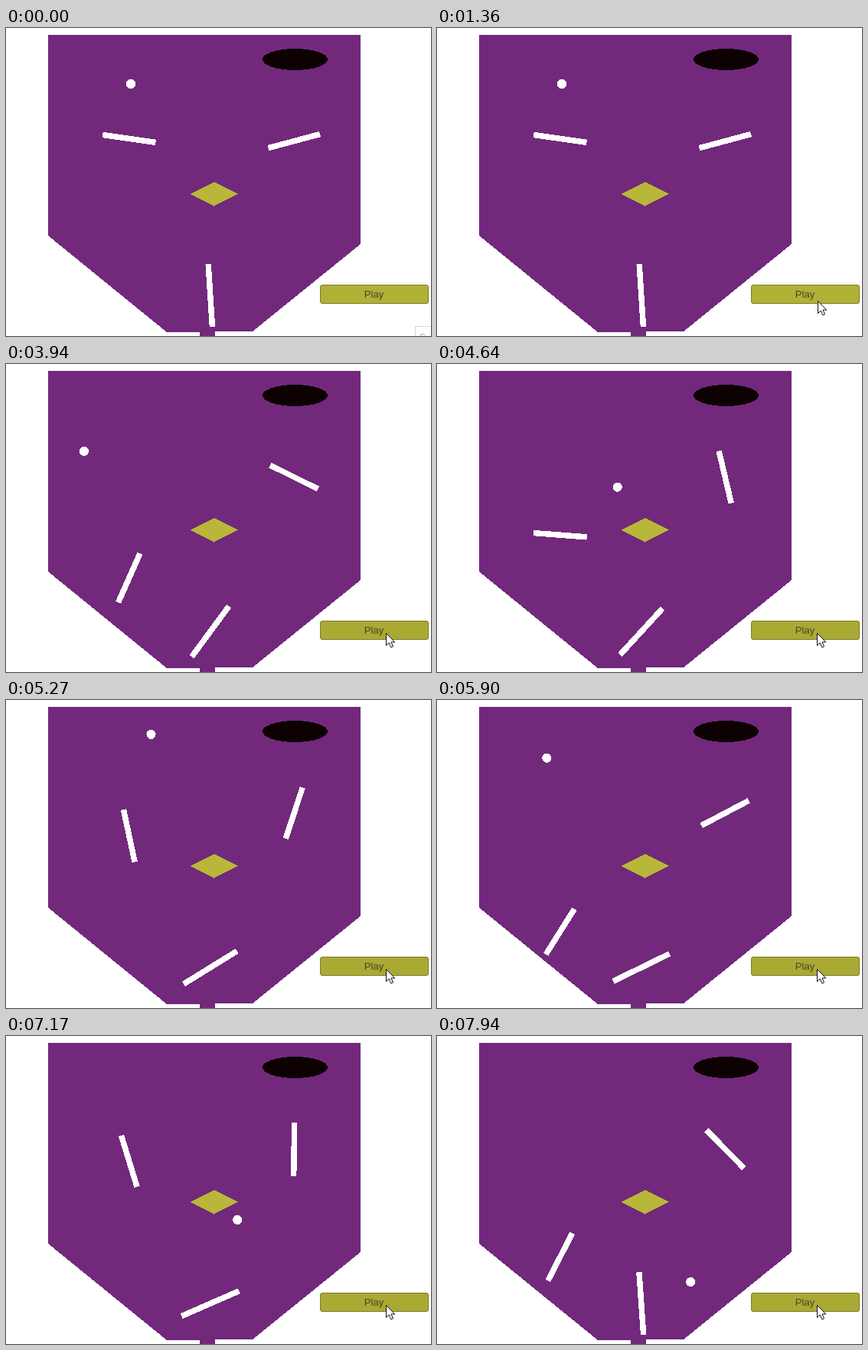
These frames come from a looping animation (555 px wide and 402 px high, 8 s). An HTML page:

```html
<!DOCTYPE html>
<html lang="en">
<head>
<meta charset="utf-8">
<title>Bouncing ball</title>
<style>
  html, body { margin: 0; width: 100%; height: 100%; overflow: hidden; background: #fff; }
  svg { display: block; }
  text { font-family: "Liberation Sans", Arial, sans-serif; }
</style>
</head>
<body>
<svg width="555" height="402" viewBox="0 0 555 402">
  <g shape-rendering="crispEdges">
    <path fill="#72297c" d="M55 9H463V282L322 396H273V402H253V397H210L55 271Z"/>
    <ellipse cx="377.5" cy="41" rx="42.5" ry="14" fill="#0c0000"/>
    <path fill="#b8b739" d="M240.5 216.5L271.5 201L302.500 216.5L271.5 232.5Z"/>
    <g fill="#fff">
      <rect id="left" x="-35" y="-3.75" width="70" height="7.5"/>
      <rect id="right" x="-35" y="-3.75" width="70" height="7.5"/>
      <rect id="bottom" x="-41" y="-3.75" width="82" height="7.5"/>
      <circle id="ball" r="6.1"/>
    </g>
  </g>
  <rect id="button" x="410.5" y="335.5" width="141" height="24" rx="2.5" stroke="#7d7b28"/>
  <text x="480.5" y="352" font-size="13" text-anchor="middle" fill="#444333">Play</text>
  <g id="tab">
    <rect x="534.5" y="389.5" width="30" height="20" fill="#fff" stroke="#d8d8d8"/>
    <text x="540" y="407" font-size="11" fill="#aaa">C</text>
  </g>
  <path id="cursor" d="M0 0V16L3.8 12.5L6.3 18.3L9 17.2L6.5 11.5H11.3Z"
        fill="#fff" stroke="#111" stroke-linejoin="round"/>
</svg>
<script>
const LOOP = 8000, PRESS = 2820, RUN = 2875, SLIDE = 3160, END = 7940;
const GRAVITY = 370, WALLS = [61, 455], BOUNCE = 0.885, GRIP = 0.33;

// each kick: time, then the velocity it gives the ball
const kicks = [
  [RUN, 0, 0], [3430, -290, -125], [4502, -73.3, -352], [6615, 380, -190]
];

const part = id => document.getElementById(id);
const clamp = v => Math.min(1, Math.max(0, v));

function place(id, x, y, angle = 0) {
  part(id).setAttribute("transform", `translate(${x} ${y}) rotate(${angle})`);
}

// steady progress to a total, with a slow surge on top
function surge(t, from, total, a, b, c) {
  const u = Math.max(0, (t - from) / (END - from)), w = 2 * Math.PI * u;
  return total * u + a * Math.sin(w) + b * (1 - Math.cos(w)) + c * Math.sin(2 * w);
}

function fly(x, y, vx, vy, sec) {
  const wall = WALLS[vx < 0 ? 0 : 1];
  const hit = vx ? (wall - x) / vx : Infinity;
  const s = Math.min(sec, hit);
  const fallen = y + vy * s + GRAVITY / 2 * s * s;
  if (hit >= sec) return [x + vx * s, fallen];
  return fly(wall, fallen, -vx * BOUNCE, (vy + GRAVITY * s) * GRIP, sec - s);
}

function ballAt(t) {
  let x = 163, y = 73;
  kicks.forEach(([at, vx, vy], i) => {
    const until = i + 1 < kicks.length ? kicks[i + 1][0] : LOOP;
    if (t > at) [x, y] = fly(x, y, vx, vy, (Math.min(t, until) - at) / 1000);
  });
  return [x, y];
}

// slides down and up, turning half way round per trip
function leftAt(t) {
  const phase = surge(t, SLIDE, 4.91, -0.048, 0.055, 0.074);
  const trip = phase % 2, down = Math.min(trip, 1), up = Math.max(trip - 1, 0);
  const windUp = 58 * (1 - clamp((t - RUN) / (SLIDE - RUN)));
  return {
    y: 144.4 + 158 * (down - up),
    angle: 66.2 - windUp + 180 * Math.floor(phase / 2) + 56 * down + 124 * up
  };
}

function pointerAt(t) {
  const glide = 1 - (1 - clamp((t - 70) / 760)) ** 2;
  const climb = Math.round(6 * clamp((t - 1200) / 1400));
  return [552 - 54.5 * glide - (climb > 4), 403 - 45.5 * glide - climb];
}

function draw(t) {
  const left = leftAt(t);
  place("left", 160.8, left.y, left.angle);
  place("right", 376.2, 147.6, -15 + surge(t, RUN, 1860, 23, -19.5, 5));
  place("bottom", 266.8, 349.2, 86.3 - surge(t, RUN, 1440, 23, -12.3, 8));
  place("ball", ...ballAt(t));
  place("cursor", ...pointerAt(t));
  part("cursor").style.display = t < 70 ? "none" : "";
  part("tab").style.display = t < 210 ? "" : "none";
  part("button").setAttribute("fill", t < PRESS ? "#b1b036" : "#aaa933");
}

const start = performance.now();
function tick() {
  draw((performance.now() - start) % LOOP);
  requestAnimationFrame(tick);
}
tick();
</script>
</body>
</html>
```
